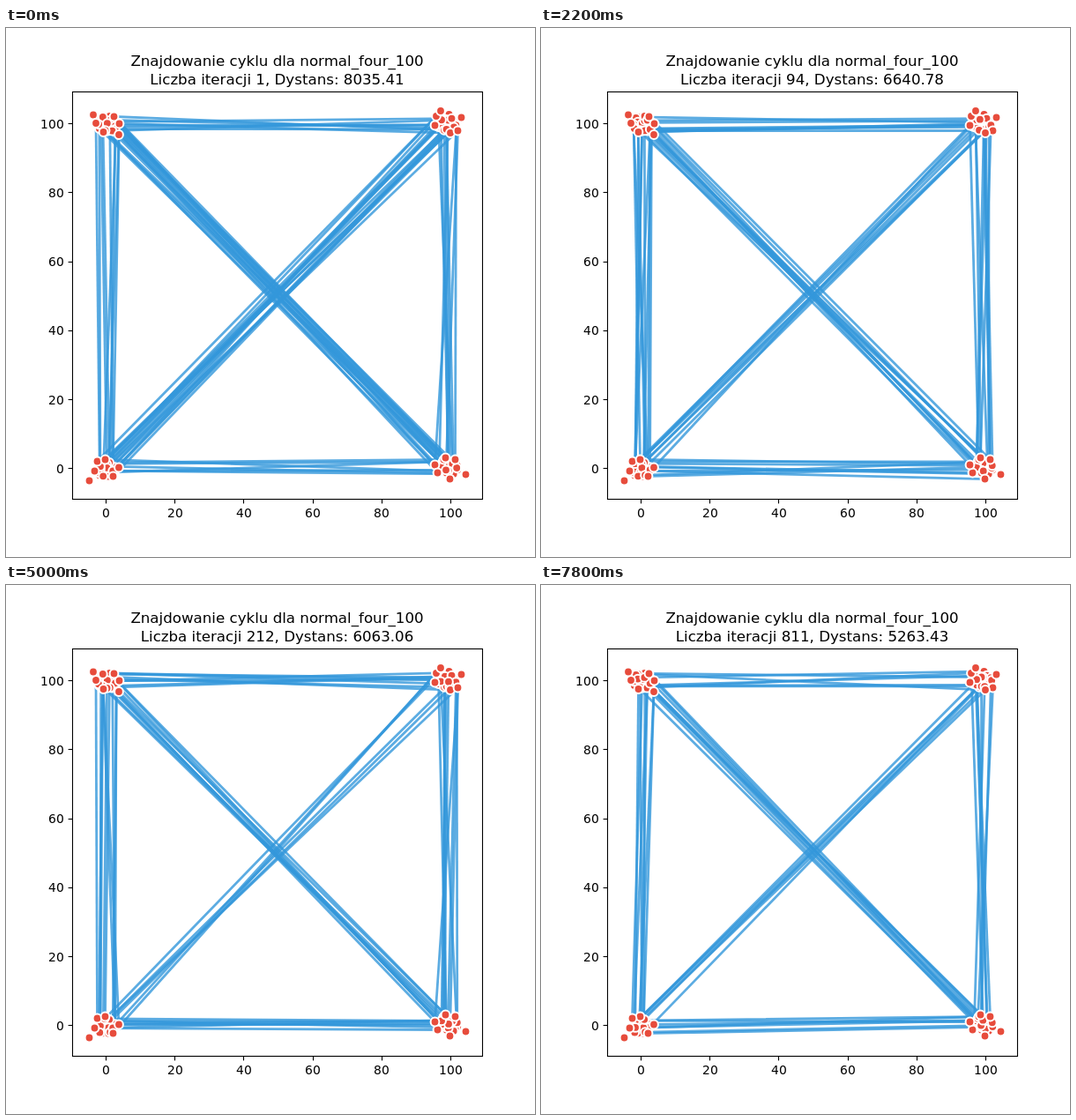
Recreate the animation shown at these times as an HTML page. Size 600 px wide and 600 px high, loop 8 s.

```html
<!DOCTYPE html>
<html lang="pl">
<head>
<meta charset="utf-8">
<style>
  html, body { margin: 0; width: 100%; height: 100%; overflow: hidden; background: #fff; }
  svg { display: block; width: 100vw; height: 100vh; }
  text { font-family: "DejaVu Sans", sans-serif; font-size: 13.89px; letter-spacing: .16px; fill: #000; }
  .title { font-size: 16.67px; letter-spacing: 0; text-anchor: middle; }
  .axis { fill: none; stroke: #000; stroke-width: 1.11; }
  .edge { stroke: #3498db; stroke-width: 2.78; stroke-opacity: .8; stroke-linecap: square; }
  .dot { fill: #e74c3c; stroke: #fff; stroke-width: 2; }
</style>
</head>
<body>
<svg viewBox="0 0 600 600">
  <g id="edges"></g>
  <g id="dots"></g>
  <g id="axes"></g>
  <text class="title" x="307.5" y="43">Znajdowanie cyklu dla normal_four_100</text>
  <text class="title" x="307.5" y="64" id="status"></text>
</svg>
<script>
const LOOP = 8000, STEP = 200, SIZE = 25, LIFE = 7, SCALE = 3.912;
const $ = id => document.getElementById(id);
const frac = v => v - Math.floor(v);

// Deterministic noise in [0, 1)
function rnd(...keys) {
  let h = 2166136261;
  for (const k of keys) {
    h = Math.imul(h ^ (k + 101), 16777619);
    h = Math.imul(h ^ (h >>> 15), 2246822519);
    h ^= h >>> 13;
  }
  return (h >>> 0) / 4294967296;
}

// Each cluster: its center and a few outer points; the rest is seeded noise
const clusters = [
  { center: [115, 109], outer: [[99, 98.5], [102, 108], [110.5, 118], [122.5, 100.5], [128, 121], [128.5, 108.5]] },
  { center: [500, 107], outer: [[516.5, 101.5], [493, 94], [488, 100], [486.5, 110.5], [512.5, 116.5], [504, 119]] },
  { center: [113, 500], outer: [[94.5, 513.5], [100.5, 502.5], [103.5, 491.5], [112.5, 489.5], [121.5, 508.5], [128, 498.5]] },
  { center: [502, 498], outer: [[521.5, 506.5], [486.5, 495.5], [489.5, 504.5], [498.5, 487.5], [509.5, 489.5], [503.5, 511.5]] }
].map(({ center: [cx, cy], outer }, c) => {
  const points = [...outer];
  for (let i = outer.length; i < SIZE; i++) {
    const angle = i * 2.4, radius = 12 * Math.sqrt(rnd(c, i));
    points.push([cx + radius * Math.cos(angle), cy + radius * Math.sin(angle) * .8]);
  }
  return { points, outer: outer.length };
});

// Cluster pairs: top, bottom, left, right and both diagonals
const pairs = [[0, 1], [2, 3], [0, 2], [1, 3], [0, 3], [1, 2]];
const sideShares = [.23, .22, .28, .27];

// step, iteration, distance
const keys = [
  [0, 1, 8035.41], [7, 31, 6944.95], [15, 156, 6336.61], [21, 178, 6199.31],
  [29, 245, 5926.80], [34, 345, 5727.76], [39, 811, 5263.43]
];

function progress(step) {
  const i = Math.max(1, keys.findIndex(key => key[0] >= step));
  const a = keys[i - 1], b = keys[i], u = (step - a[0]) / (b[0] - a[0]);
  const [, iteration, distance] = a.map((v, j) => v + (b[j] - v) * u);
  return { iteration: Math.round(iteration), distance };
}

// Diagonals die out; the sides make up the remaining distance
function edgeCounts(step, distance) {
  const fall = Math.exp(-step / 7);
  const diagonals = [9 + 8 * fall, 6 + 10 * fall];
  const sides = (distance - 110 - 141 * (diagonals[0] + diagonals[1])) / 100;
  return [...sideShares.map(s => s * sides), ...diagonals].map(Math.round);
}

const line = (a, b, cls) => `<line class="${cls}" x1="${a[0]}" y1="${a[1]}" x2="${b[0]}" y2="${b[1]}"/>`;

// Endpoints spread evenly over the cluster and jump once per lifetime
function endpoint(c, g, k, end, step) {
  const epoch = Math.floor(step / LIFE + rnd(g, k));
  const u = frac(rnd(g, end) + k * (end ? Math.SQRT2 : .618) + epoch * (end ? .27 : .59));
  return clusters[c].points[1 + Math.floor(u * (SIZE - 1))];
}

function edgeMarkup(step, counts) {
  let out = "";
  pairs.forEach(([a, b], g) => {
    for (let k = 0; k < counts[g]; k++)
      out += line(endpoint(a, g, k, 0, step), endpoint(b, g, k, 1, step), "edge");
  });
  return out;
}

function dotMarkup(step) {
  return clusters.map(({ points, outer }, c) => points
    .map(([x, y], i) => ({ x, y, z: (i < outer) + rnd(c, i, Math.floor(step / LIFE + rnd(c, i))) }))
    .sort((p, q) => p.z - q.z)
    .map(p => `<circle class="dot" cx="${p.x}" cy="${p.y}" r="4.9"/>`).join("")).join("");
}

function drawAxes() {
  let out = '<rect class="axis" x="75.5" y="72.5" width="465" height="462"/>';
  for (let v = 0; v <= 100; v += 20) {
    const cx = 113.4 + v * SCALE, cy = 499.9 - v * SCALE;
    const x = Math.floor(cx) + .5, y = Math.floor(cy) + .5, width = 9 * String(v).length;
    out += line([x, 534.5], [x, 539.4], "axis") + line([70.6, y], [75.5, y], "axis") +
      `<text x="${Math.round(cx - width / 2)}" y="555">${v}</text>` +
      `<text x="${66 - width}" y="${Math.round(cy + 5.06)}">${v}</text>`;
  }
  $("axes").innerHTML = out;
}

let shown = -1;
function render(time) {
  const step = Math.floor(time % LOOP / STEP);
  if (step === shown) return;
  shown = step;
  const { iteration, distance } = progress(step);
  $("status").textContent = `Liczba iteracji ${iteration}, Dystans: ${distance.toFixed(2)}`;
  $("edges").innerHTML = edgeMarkup(step, edgeCounts(step, distance));
  $("dots").innerHTML = dotMarkup(step);
}

function tick() {
  render(performance.now());
  requestAnimationFrame(tick);
}
drawAxes();
tick();
</script>
</body>
</html>
```
